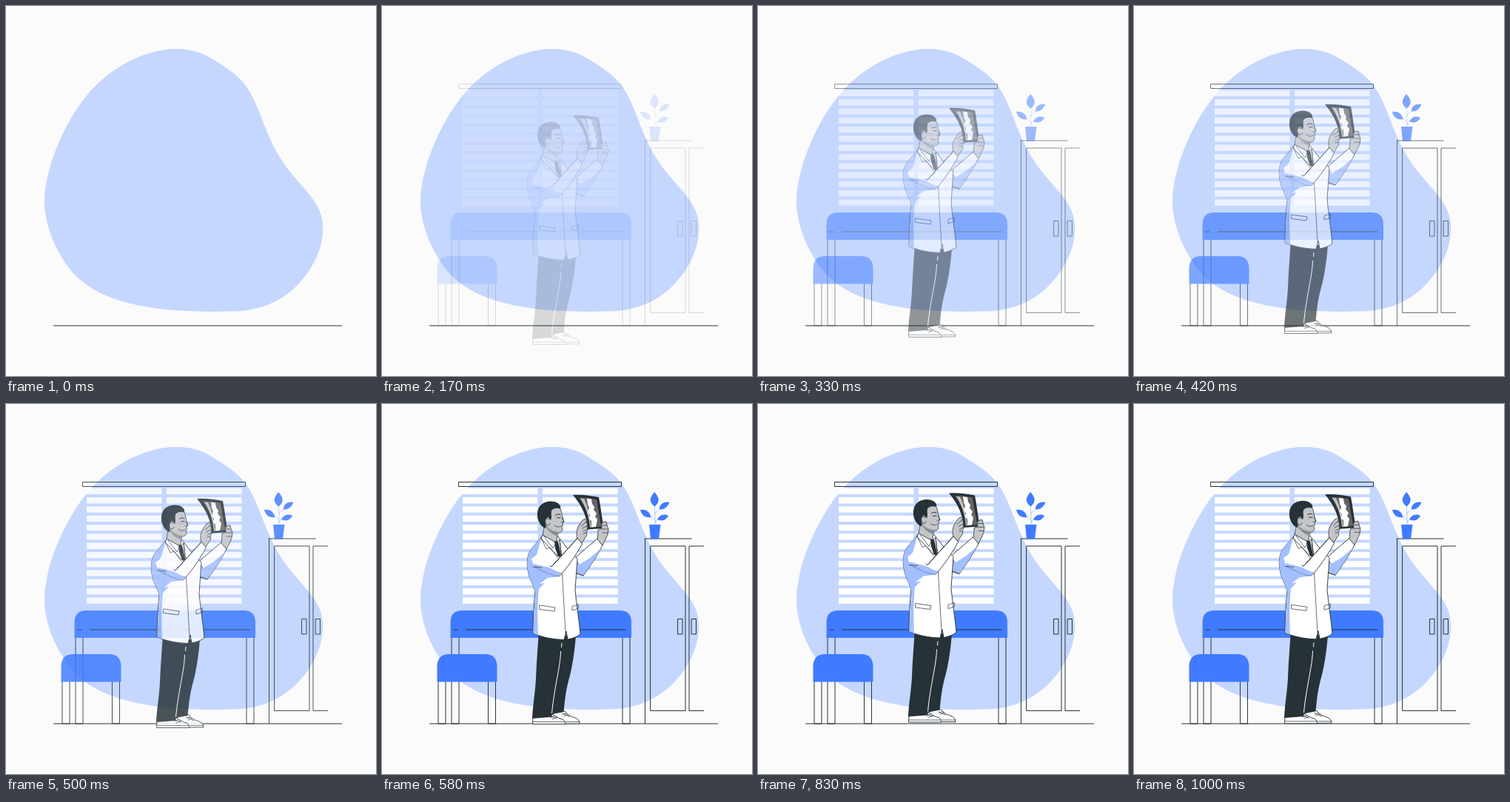
An HTML page for the animation above (1040 ms loop, 500 by 500 pixels).

```html
<!DOCTYPE html>
<html lang="en">
<head>
<meta charset="utf-8">
<title>Doctor with an X-ray</title>
<style>
html, body { margin: 0; width: 100%; height: 100%; overflow: hidden; background: #fbfbfb; }
svg { display: block; width: 100vw; height: 100vh; }
.line { fill: none; stroke: #263238; stroke-width: 1; stroke-linecap: round; stroke-linejoin: round; }
.white { fill: #fff; stroke: #263238; stroke-width: .9; stroke-linejoin: round; }
.skin { fill: #c4c5c6; stroke: #263238; stroke-width: .8; stroke-linejoin: round; }
.thin { stroke-width: .7; }
.stem { stroke: #407bff; stroke-opacity: .45; stroke-width: .8; }
.blue { fill: #407bff; }
.shade { fill: #a3bfff; }
.dark { fill: #263238; }
</style>
</head>
<body>
<svg viewBox="0 0 500 500">
  <path fill="#c5d7ff" d="M230 58C250 58 266 63 281 73C302 86 318 96 330 117C346 146 350 172 371 206C391 238 418 256 426 283C434 314 420 352 391 380C366 403 338 412 309 412.5C255 414 206 412 168 402C122 391 94 371 76 341C59 313 51 284 52 261C54 215 79 158 109 121C139 84 187 58 230 58Z"/>
  <path class="line" d="M64.5 432H453.5"/>

  <g class="fade">
    <g id="blinds" fill="#fff"></g>
    <path class="line" d="M104 105.5H323.5V111.5H104Z"/>
  </g>

  <g class="fade">
    <path class="line" d="M355.500 432V182M355.500 182H418M363 192H410V414.500H363ZM434.500 192H415V414.500H434.500M400 290.500H406V311H400ZM418.500 290.500H424.500V311H418.500Z"/>
  </g>

  <g class="fade">
    <path class="line stem" d="M369 163L368.500 136M369 158Q368 154 362 152M369 149Q370 144 376 142M369 160Q370 157 374 155"/>
    <path class="blue" d="M361 163H376.500L374 182.500H363ZM368 119C361 127 361 133 368.500 138.500C376 133 375 126 368 119ZM349 143C351 151 356 154 363.500 153C362 145 356 142 349 143ZM388.500 132.500C380 132 375 135 375 142.500C382 143 386 139 388.500 132.500ZM387 151C380 148 375 150 372 156C378 159 384 157 387 151Z"/>
  </g>

  <g class="fade">
    <path class="line" d="M94 316V432H104V316M325 316V432H335V316"/>
    <path class="blue" d="M92.500 316V295Q92.500 279 109 279H321Q337 279 337 295V316Z"/>
    <path class="line" d="M96.500 305H102M113.500 305H329"/>
  </g>

  <g class="fade">
    <path class="line" d="M76 375V432H86V375M143.500 375V432H153.500V375"/>
    <path class="blue" d="M74.500 375.500V354Q75 338 91 338H139Q155 338 155.500 354V375.500Z"/>
  </g>

  <g class="fade" id="doctor">
    <!-- shoes and trousers -->
    <path class="white" d="M231 417L247 414C251 421 257 421 263 424Q267 426 267 431H232Z"/>
    <path class="white" d="M204 421L229 417C233 421 239 424 244 425Q248 427 248 431.500H203.500Z"/>
    <path class="line thin" d="M204 428.500H247M249 428.500H267M226 421L231 418M228 423L234 420M230 425L237 422M226 420L236 424M244 419L250 417M246 421L252 418.500M244 417L254 422"/>
    <path class="dark" d="M211.500 312H262C260 338 256 360 252 373C247 393 247 403 245.500 415L230 418L229 422L203 424C204 404 207 389 208 370C209 347 210 335 211.500 312Z"/>
    <path fill="none" stroke="#fff" stroke-width="1" d="M243 322L242.500 328M241.500 333C241 355 233 380 229.500 417"/>

    <!-- far arm -->
    <path class="white" d="M256 211L291 181L298 190C290 206 282 217 272 231L259 227Z"/>
    <path class="shade" d="M263 210L266 216L281 207L296 194C289 207 281 218 272 230.500L261 226Z"/>
    <path class="line thin" d="M262 210L266 215M272 231L262 227"/>

    <!-- coat -->
    <path class="white" d="M217 177L201 196C194 207 196 221 199 232L207 251C205 272 204 290 204 309C216 314 230 317 246 317.500L249 306L251 317Q262 315 268 310C266 288 263 272 261 250L264 208L252 196L238 178Z"/>
    <path class="shade" d="M216 178L201 196C194 207 196 221 199 232L207 251L204.500 309L211 311.500C210 288 210 268 212 249L220 241L213 242L224 234L241 232L226 224L205 217L202 208L209 203Z"/>
    <path class="line thin" d="M243 222C245 251 246 275 248 308M213 271L234 274L233 279L213 276.500ZM265 270L257 272.500V278L265 275.500Z"/>

    <!-- neck, collar and tie -->
    <path class="skin" d="M219 162L217 178L235 188L238 172Z"/>
    <path fill="#8d9296" d="M224 169Q230 173 238 173L237 178Q229 175 224 169Z"/>
    <path class="white" d="M217 176L235 186L240 182L243 208L236 203L215 181Z"/>
    <path class="dark" d="M233 184L238 185L239 189L242.500 206L238 205L234 194Z"/>
    <path class="line thin" d="M215 180L222 195L227 193L239 209M235 186L231 194L219 178M240 183L243 207"/>

    <!-- head -->
    <path class="skin" d="M220 148C225 138 238 135 241 140C243 145 243 149 244 152L246 158L244 160L244.500 163L243 165C245 169 243 173 238 173C231 173 224 169 220 164Z"/>
    <path fill="#a4a8ab" d="M222 163Q228 171 241 171.500Q240 173 236 173Q226 171 220 164Z"/>
    <path class="dark" d="M220 167C213 163 209 154 210 146C211 136 218 131 227 130.500C234 130 240 133 241.500 138L240 140.500C236 139 232 140 229 143C228 148 230 152 228 156L224.500 152C220 153 220 160 222 164Z"/>
    <path class="skin" d="M226 155C221 151 219 158 222.500 162.500Q226 164 227 160"/>
    <path class="line" d="M234.500 149Q238 146.500 241 148.500M236.500 153L241 152.500"/>
    <path class="line thin" d="M233 163Q237 167 242 164M243 153L246 158L242 159"/>

    <!-- film -->
    <path class="dark" d="M258 122C270 121 282 123 293 125C296 140 297 153 300 167L278 168.500C277 151 270 136 258 122Z"/>
    <path fill="#676563" d="M266 125.500C275 125.500 282 126.500 290 128C292 141 294 153 296.500 164.500L281 166C280 151 275 137 266 125.500Z"/>
    <path fill="#c5c5c5" d="M268 126.500L273 127C279 139 281 152 282.500 165.500L281 166C280 151 275 137 268 126.500Z"/>
    <path fill="#fff" d="M277 126.500L283 127.500L284 134L287 138L286 142L290 147L288 151L291 155L289 165L283 165.500L283 157L280 154L281 149L278 145L280 139L278 135Z"/>

    <!-- hands -->
    <path class="skin" d="M264 181C262 175 263 168 266 163L271 156Q275 153 277 155L275 159L278 161L277 165L278 169L276 173L277 176L270 187Z"/>
    <path class="line thin" d="M275 159L269 164M278 163L271 167M278 168L272 171M276 173L272 174"/>
    <path class="skin" d="M291 182L292 173L292 169L297 167L296 162Q299 157 303 158L304 163L306 168L305 175L303 180L298 190Z"/>
    <path class="line thin" d="M304 163L297 163M305 168L297 168M305 173L298 173"/>

    <!-- near arm -->
    <path class="white" d="M264 180L270.500 188C261 205 250 221 240 231.500C234 232 222 227 206 219L211 205L229 219Z"/>
    <path class="shade" d="M206 215L226 220L238 226L243 227L240 231.500C231 232 216 224 204 218Z"/>
    <path fill="#fff" d="M208 203L215 198L229 216L222 219L206 215Z"/>
    <path class="line thin" d="M264 181L229 219M204 219L216 220M239 209L232 215"/>
  </g>
</svg>
<script>
const LOOP = 1040, FRAME = LOOP / 25;
const blinds = document.getElementById('blinds');
const doctor = document.getElementById('doctor');
const fades = document.querySelectorAll('.fade');

let slats = '';
for (let i = 0; i < 13; i++) {
  const y = 113.8 + 12.3 * i;
  slats += `<path d="M109 ${y}h101.500v8.300h-101.500zM217 ${y}h101.500v8.300h-101.500z"/>`;
}
blinds.innerHTML = slats;

function draw(now) {
  // 24 steps a second: fade and slide in, then one small bob
  const step = Math.floor((now % LOOP + 5) / FRAME) % 25;
  const shown = Math.min(1, Math.max(0, (step - 1.95) / 12.05));
  const bob = step > 14 ? 2.5 * Math.sin(Math.PI * (step - 14) / 11) : 0;
  fades.forEach(g => g.setAttribute('opacity', shown));
  doctor.setAttribute('transform', `translate(0 ${30 * (1 - shown) - bob + 1})`);
}

const start = performance.now();
function tick() {
  draw(performance.now() - start);
  requestAnimationFrame(tick);
}
tick();
</script>
</body>
</html>
```
